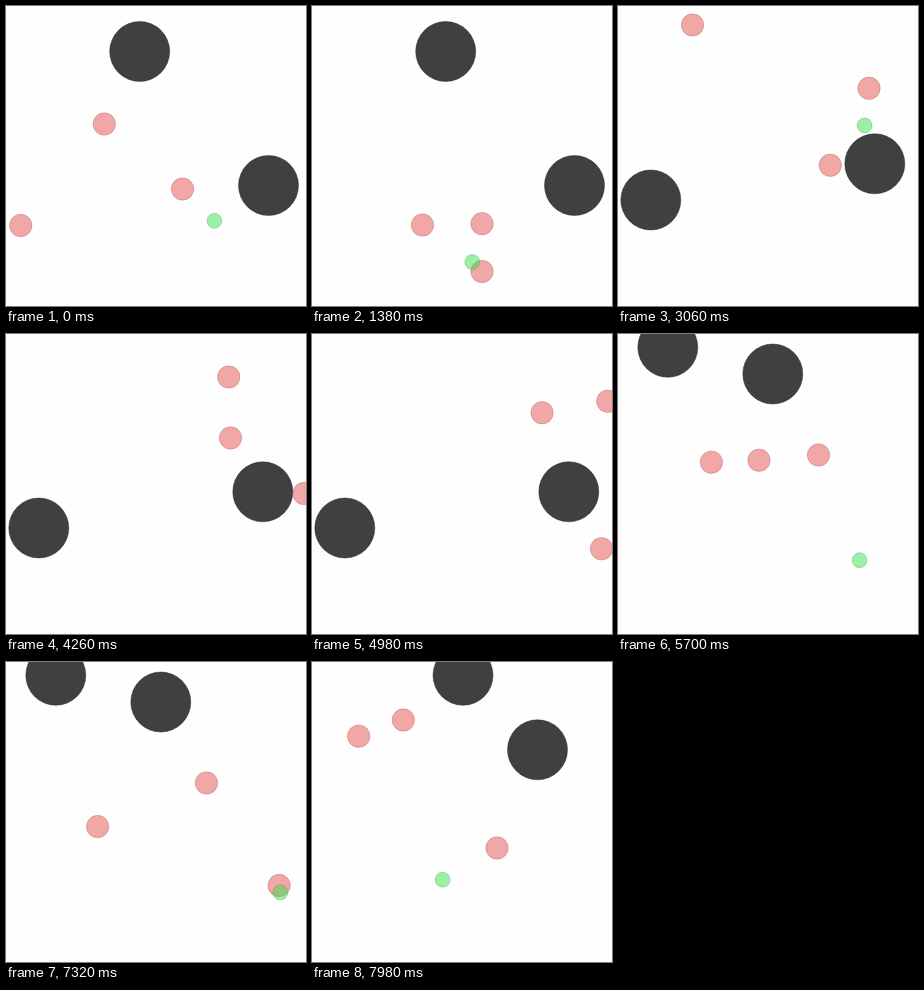
Animation of 300x300 px, one loop 8000 ms. Source, as an HTML page:

```html
<!DOCTYPE html>
<html lang="en">
<head>
<meta charset="utf-8">
<title>Pursuit</title>
<style>
  html, body { margin: 0; width: 100%; height: 100%; overflow: hidden; background: #fefefe; }
  svg { display: block; width: 100vw; height: 100vh; stroke-width: .86; }
  .rock { fill: #404040; stroke: rgba(32, 32, 32, .5); }
  .chaser { fill: rgba(230, 80, 80, .5); stroke: rgba(115, 40, 40, .25); }
  .runner { fill: rgba(55, 225, 75, .5); stroke: rgba(28, 112, 38, .25); }
</style>
</head>
<body>
<svg viewBox="0 0 300 300">
  <circle class="rock" r="30"/>
  <circle class="rock" r="30"/>
  <circle class="chaser" r="11.25"/>
  <circle class="chaser" r="11.25"/>
  <circle class="chaser" r="11.25"/>
  <circle class="runner" r="7.5"/>
</svg>
<script>
const LOOP = 8000, ROUND = 2520, STEP = 60;

const still = (x, y) => () => [x, y];

// Constant acceleration: at `from` when u = 0, at `to` when u = 1, bent by `pull`.
const move = (from, to, pull = [0, 0]) => u =>
  from.map((a, axis) => a + (to[axis] - a) * u + pull[axis] * u * (1 - u));

// Each round maps the time span begin..end to u = 0..1;
// coast is how far u may run on past 1 while slowing down.
const rounds = [
  {
    begin: 0, end: 1380, coast: .2,
    bodies: [
      still(133.7, 45.5),
      still(262.5, 179.5),
      move([98.3, 118], [170, 217.7], [-72, -100]),
      move([176.5, 183], [170, 265.5], [60, 40]),
      move([14.7, 219.5], [110.5, 219], [-96, 0]),
      move([208.4, 214.8], [160.3, 256], [120, 30])
    ]
  },
  {
    begin: 3060, end: 4260, coast: .6,
    bodies: [
      still(32.8, 194),
      still(256.8, 157.8),
      move([74.5, 19], [222.7, 43], [-8, -20]),
      move([212.3, 159.3], [224.5, 104]),
      move([251, 82.3], [298, 159.5], [45, -30]),
      move([246.6, 119.5], [410, 130])
    ]
  },
  {
    begin: 5700, end: 6480, coast: .5,
    bodies: [
      still(49.8, 13.3),
      still(154.8, 40),
      move([93.4, 128.2], [95.6, 170.7], [7, 37]),
      move([141, 126.2], [218.2, 169.7], [-24, -45]),
      still(200.5, 121),
      move([241.6, 226.2], [263.6, 229])
    ]
  },
  {
    begin: 7680, end: 7980, coast: .2,
    bodies: [
      still(151, 13.3),
      still(225.5, 87.8),
      move([55, 87], [46.7, 74.2]),
      move([89.5, 29], [91.3, 58]),
      move([205, 181], [185, 186]),
      move([140, 212], [130.6, 217.7])
    ]
  }
];

function progress({ begin, end, coast }, t) {
  const u = (t - begin) / (end - begin);
  return u > 1 ? 1 + coast * Math.tanh((u - 1) / coast) : u;
}

const circles = document.querySelectorAll("circle");
const origin = performance.now();

function draw() {
  const elapsed = (performance.now() - origin) % LOOP;
  const t = Math.floor(elapsed / STEP) * STEP;
  const round = rounds[Math.floor(t / ROUND)];
  const u = progress(round, t);
  circles.forEach((circle, i) => {
    const [x, y] = round.bodies[i](u);
    circle.setAttribute("cx", x);
    circle.setAttribute("cy", y);
  });
  requestAnimationFrame(draw);
}
draw();
</script>
</body>
</html>
```
